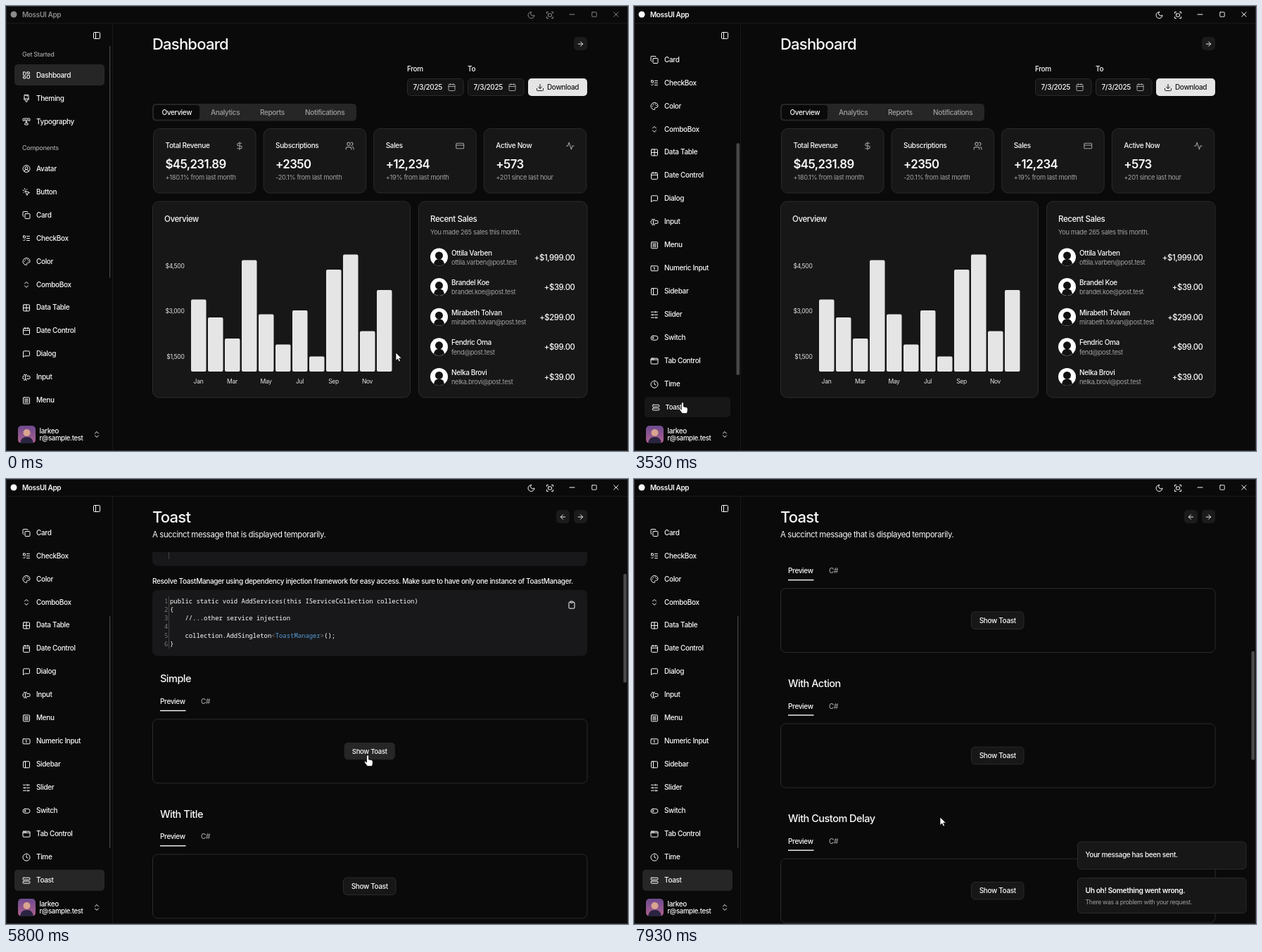
An HTML page that plays this animation: 884 by 633 pixels, repeating every 8000 ms.

```html
<!DOCTYPE html>
<html lang="en">
<head>
<meta charset="utf-8">
<title>Dashboard demo</title>
<style>
html, body { margin: 0; width: 100%; height: 100%; overflow: hidden; background: #0a0a0a; }
svg { display: block; width: 884px; height: 633px; }
text { font-family: Inter, sans-serif; letter-spacing: -.035em; white-space: pre; }
.code { font-family: "Noto Sans Mono", monospace; letter-spacing: 0; }
.icon { fill: none; stroke-linecap: round; stroke-linejoin: round; stroke-width: 2; }
</style>
</head>
<body>
<svg id="stage" viewBox="0 0 884 633"></svg>
<script>
const LOOP = 8000, NOTCH = 34.375, SIDE_MAX = 221;
const WHITE = '#fafafa', MUTED = '#a1a1a1', CARD = '#171717', LINE = '#2b2b2b';

// Path pieces on a 24 unit icon grid
const box = (x, y, w, h, r = 2) =>
  `M${x + r} ${y}h${w - 2 * r}a${r} ${r} 0 0 1 ${r} ${r}v${h - 2 * r}a${r} ${r} 0 0 1 ${-r} ${r}h${2 * r - w}a${r} ${r} 0 0 1 ${-r} ${-r}v${2 * r - h}a${r} ${r} 0 0 1 ${r} ${-r}z`;
const ring = (x, y, r) => box(x - r, y - r, 2 * r, 2 * r, r);

const ICONS = {
  Dashboard: box(3, 3, 7, 9, 1) + box(14, 3, 7, 5, 1) + box(14, 12, 7, 9, 1) + box(3, 16, 7, 5, 1),
  Theming: 'M10 2v2M14 2v4M6 12V2h12v10zM6 12l-1 2a2 2 0 0 0 2 2h3v4a2 2 0 1 0 4 0v-4h3a2 2 0 0 0 2-2l-1-2',
  Typography: 'M14 17h1a2 2 0 0 1 0 4H9a2 2 0 0 1 0-4h1V7H6v1a2 2 0 0 1-4 0V5a2 2 0 0 1 2-2h16a2 2 0 0 1 2 2v3a2 2 0 0 1-4 0V7h-4z',
  Avatar: 'M18 20a6 6 0 0 0-12 0' + ring(12, 10, 4) + ring(12, 12, 10),
  Button: 'M14 4l-2 2M5 8l-3-1M6 12l-2 2M7 2l1 3M9 9l12 5-5 2-2 5z',
  Card: box(8, 8, 14, 14) + 'M4 16a2 2 0 0 1-2-2V4a2 2 0 0 1 2-2h10a2 2 0 0 1 2 2',
  CheckBox: box(3, 5, 6, 6, 1) + 'M3 17l2 2 4-4M13 6h8M13 12h8M13 18h8',
  Color: 'M12 2a10 10 0 0 0 0 20c2 0 2-2 1-3s0-3 2-3h2a5 5 0 0 0 5-5c0-5-4-9-10-9z' + ring(14, 6.5, .5) + ring(17.5, 10.5, .5) + ring(8.5, 7.5, .5) + ring(6.5, 12.5, .5),
  ComboBox: 'M7 15l5 5 5-5M7 9l5-5 5 5',
  'Data Table': box(3, 3, 18, 18) + 'M12 3v18M3 12h18',
  'Date Control': box(3, 4, 18, 18) + 'M8 2v4M16 2v4M3 10h18',
  Dialog: 'M21 15a2 2 0 0 1-2 2H7l-4 4V5a2 2 0 0 1 2-2h14a2 2 0 0 1 2 2z',
  Input: 'M5 4h1a3 3 0 0 1 3 3 3 3 0 0 1 3-3h1M13 20h-1a3 3 0 0 1-3-3 3 3 0 0 1-3 3H5M5 16H4a2 2 0 0 1-2-2v-4a2 2 0 0 1 2-2h1M13 8h7a2 2 0 0 1 2 2v4a2 2 0 0 1-2 2h-7M9 7v10',
  Menu: box(3, 3, 18, 18) + 'M7 8h10M7 12h10M7 16h10',
  'Numeric Input': box(2, 5, 20, 14) + 'M10 10l2-1v6',
  Sidebar: box(3, 3, 18, 18) + 'M9 3v18',
  Slider: 'M21 4h-7M10 4H3M21 12h-9M8 12H3M21 20h-5M12 20H3M14 2v4M8 10v4M16 18v4',
  Switch: box(2, 6, 20, 12, 6) + ring(8, 12, 2),
  'Tab Control': box(2, 4, 20, 16) + 'M10 4v4M2 8h20M6 4v4',
  Time: ring(12, 12, 10) + 'M12 6v6l4 2',
  Toast: box(2, 4, 20, 6) + box(2, 14, 20, 6),
  moon: 'M12 3a6 6 0 0 0 9 9 9 9 0 1 1-9-9z',
  full: 'M3 7V3h4M17 3h4v4M21 17v4h-4M7 21H3v-4' + box(7, 8, 10, 8, 1),
  min: 'M5 11h14', max: box(5, 5, 14, 14, 1), close: 'M5 5l14 14M19 5L5 19',
  dollar: 'M12 2v20M17 5H9.5a3.5 3.5 0 0 0 0 7h5a3.5 3.5 0 0 1 0 7H6',
  users: 'M16 21v-2a4 4 0 0 0-4-4H6a4 4 0 0 0-4 4v2M22 21v-2a4 4 0 0 0-3-4M16 3a4 4 0 0 1 0 8' + ring(9, 7, 4),
  credit: box(2, 5, 20, 14) + 'M2 10h20',
  pulse: 'M22 12h-4l-3 9L9 3l-3 9H2',
  right: 'M5 12h14M12 5l7 7-7 7', left: 'M19 12H5M12 5l-7 7 7 7',
  download: 'M21 15v4a2 2 0 0 1-2 2H5a2 2 0 0 1-2-2v-4M7 10l5 5 5-5M12 15V3',
  clipboard: box(8, 2, 8, 4, 1) + 'M16 4h2a2 2 0 0 1 2 2v14a2 2 0 0 1-2 2H6a2 2 0 0 1-2-2V6a2 2 0 0 1 2-2h2'
};

const text = (x, cy, s, size = 10, fill = WHITE, weight = 500, anchor = 'start') =>
  `<text x="${x}" y="${cy + size * .36}" font-size="${size}" font-weight="${weight}" fill="${fill}" text-anchor="${anchor}">${s}</text>`;
const rect = (x, y, w, h, r, fill, stroke = 'none') =>
  `<rect x="${x}" y="${y}" width="${w}" height="${h}" rx="${r}" fill="${fill}" stroke="${stroke}"/>`;
const icon = (name, cx, cy, size = 12, color = WHITE) =>
  `<path class="icon" stroke="${color}" d="${ICONS[name]}" transform="translate(${cx - size / 2} ${cy - size / 2}) scale(${size / 24})"/>`;
const group = (id, body) => `<g id="${id}">${body}</g>`;
const navButton = (name, x) => rect(x, 44, 19, 19, 5, '#1b1b1b') + icon(name, x + 9.5, 54, 11);

// Sidebar
const rowY = {};
let sidebar = text(23, 69, 'Get Started', 9, MUTED) + text(23, 202, 'Components', 9, MUTED);
Object.keys(ICONS).slice(0, 21).forEach((name, i) => {
  const y = rowY[name] = i < 3 ? 98 + 33 * i : 231 + 32.98 * (i - 3);
  sidebar += `<g data-row="${name}">${rect(12, y - 15, 128, 30, 5, 'none')}${icon(name, 29, y + .5)}${text(43, y, name)}</g>`;
});
const account =
  rect(17, 597, 25, 25, 5, 'url(#dusk)') +
  '<path d="M20 622q1-9 9.500-9t9.500 9z" fill="#2a2440"/><circle cx="29.500" cy="607" r="5" fill="#d9a58f"/>' +
  text(47.5, 604, 'larkeo') + text(47.5, 615, 'r@sample.test', 9.6) + icon('ComboBox', 129, 609.5);

// Title bar
const titleBar = '<circle cx="11" cy="12" r="4.5" fill="currentColor"/>' +
  text(23, 12, 'MossUI App', 10, 'currentColor', 600) +
  [['moon', 746.5, 13], ['full', 773, 13], ['min', 804.5, 12.5], ['max', 836, 12, 11], ['close', 867, 12, 11]]
    .map(([n, x, y, s = 12]) => icon(n, x, y, s, 'currentColor')).join('');

// Dashboard page
const dateField = (x, label) => text(x, 89.5, label) + rect(x + .5, 103.5, 79.5, 24, 5, '#141414', LINE) +
  text(x + 8.5, 115.5, '7/3/2025') + icon('Date Control', x + 63.5, 115.5, 12, MUTED);
const stats = [
  ['Total Revenue', '$45,231.89', '+180.1% from last month', 'dollar'],
  ['Subscriptions', '+2350', '-20.1% from last month', 'users'],
  ['Sales', '+12,234', '+19% from last month', 'credit'],
  ['Active Now', '+573', '+201 since last hour', 'pulse']
].map(([label, value, note, glyph], i) => {
  const x = 209.5 + 156.6 * i;
  return rect(x, 174.5, 145.5, 91.5, 9, CARD, LINE) + text(x + 17, 198.5, label) +
    icon(glyph, x + 122.5, 199, 13, MUTED) + text(x + 17, 225, value, 16.8, WHITE, 600) + text(x + 17, 243.5, note, 9.3, MUTED, 400);
}).join('');
const bars = [417.5, 443, 473, 361.5, 438.5, 481.5, 433, 498.5, 375, 353.5, 462.5, 404]
  .map((y, i) => rect(263 + 24 * i, y, 21.5, 520 - y, 2, '#e5e5e5')).join('');
const sales = [
  ['Ottila Varben', 'ottila.varben', '1,999'], ['Brandel Koe', 'brandel.koe', '39'],
  ['Mirabeth Tolvan', 'mirabeth.tolvan', '299'], ['Fendric Oma', 'fend', '99'], ['Nelka Brovi', 'nelka.brovi', '39']
].map(([name, mail, sum], i) => {
  const y = 357 + 42.6 * i;
  return `<circle cx="615.5" cy="${y}" r="12.5" fill="#fff"/><circle cx="615.5" cy="${y - 2}" r="5.500" fill="#111"/>` +
    `<path d="M608 ${y + 10}q1-7 7.500-7t7.500 7q-7.500 5-15 0" fill="#111"/>` +
    text(633, y - 6, name) + text(633, y + 7.5, mail + '@post.test', 9.2, MUTED, 400) + text(808.5, y + .5, `+$${sum}.00`, 11.3, WHITE, 500, 'end');
}).join('');
const dashboard = text(208, 54, 'Dashboard', 22) + navButton('right', 807) +
  dateField(570, 'From') + dateField(656, 'To') +
  rect(742, 103, 84, 25, 5, '#e5e5e5') + icon('download', 759, 116, 12, CARD) + text(769, 115.5, 'Download', 10, CARD) +
  rect(208, 139, 290, 24.5, 5, '#262626') + rect(210, 141, 65, 20.5, 4, '#0a0a0a') + text(221.5, 151.5, 'Overview') +
  [['Analytics', 291], ['Reports', 361], ['Notifications', 425]].map(([s, x]) => text(x, 151.5, s, 10, MUTED)).join('') +
  stats +
  rect(208.5, 278, 366, 279, 9, CARD, LINE) + text(225, 302.5, 'Overview', 11.5) + bars +
  ['$4,500', '$3,000', '$1,500'].map((s, i) => text(253.5, 369.5 + 64.5 * i, s, 8.5, '#e5e5e5', 400, 'end')).join('') +
  ['Jan', 'Mar', 'May', 'Jul', 'Sep', 'Nov'].map((s, i) => text(273.5 + 48 * i, 534, s, 8.5, '#e5e5e5', 400, 'middle')).join('') +
  rect(586.5, 278, 239.5, 279, 9, CARD, LINE) + text(603, 302.5, 'Recent Sales', 11.5) +
  text(603, 322, 'You made 265 sales this month.', 9.2, MUTED, 400) + sales;

// Toast page
const span = (fill, s) => `<tspan fill="${fill}">${s}</tspan>`;
const codeBlock = (y, h, lines) => rect(208, y, 618, h, 7, '#18181a') + icon('clipboard', 804, y + 21.5, 12) +
  `<path d="M231.500 ${y + 9}v${h - 19}" stroke="#444"/>` +
  lines.map((s, i) => {
    const at = `class="code" font-size="8.92" y="${y + 19.2 + 12.2 * i}"`;
    return `<text ${at} x="225" fill="#777">${i + 1}</text><text ${at} x="233" fill="#fff" font-weight="500">${s}</text>`;
  }).join('');
const BLUE = '#569cd6', GREEN = '#6a9955', GREY = '#808080', RUST = '#ce9178';
const markup = [
  '    &lt;!── rest of the codes ' + span(GREEN, '──&gt;'),
  '    ' + span(GREY, '&lt;') + span(BLUE, 'toasts:ToastHost') + span('#9cdcfe', ' Manager') + '=' + span(RUST, '"{Binding ToastManager}"') + span(MUTED, ' /&gt;')
];
const setup = ['public static void AddServices(this IServiceCollection collection)', '{', '    //...other service injection', '',
  '    collection.AddSingleton' + span(GREY, '&lt;') + span(BLUE, 'ToastManager') + span(GREY, '&gt;') + '();', '}'];
const demos = ['Simple', 'With Title', 'With Action', 'With Custom Delay'].map((title, i) => {
  const y = 192.25 * i;
  return text(219, 318.5 + y, title, 14.5) + text(219, 351 + y, 'Preview') + text(277, 351 + y, 'C#', 10, MUTED) +
    rect(219, 363.2 + y, 36.5, 1.4, 0, WHITE) + rect(208.5, 376 + y, 617.5, 91, 7, 'none', LINE) +
    `<g data-demo="${i}">${rect(479.5, 409.2 + y, 74.5, 24.5, 5, CARD, LINE)}${text(516.75, 421.5 + y, 'Show Toast', 10, WHITE, 500, 'middle')}</g>`;
}).join('');
const toastPage = text(208, 54, 'Toast', 22) + navButton('left', 782) + navButton('right', 807) +
  text(208, 78.5, 'A succinct message that is displayed temporarily.', 11.4, WHITE, 400) +
  `<g clip-path="url(#pageClip)">${group('doc', codeBlock(103.5, 54.5, markup) +
    text(208, 179.5, 'Resolve ToastManager using dependency injection framework for easy access. Make sure to have only one instance of ToastManager.') +
    codeBlock(192, 94, setup) + demos)}</g>` +
  '<rect id="docBar" fill="#4a4a4a"/>';

const toast1 = rect(630.5, 578.5, 239.5, 39, 5, CARD, LINE) + text(641.5, 597, 'Your message has been sent.');
const toast2 = rect(630.5, 567.5, 239.5, 50, 5, CARD, LINE) + text(641.5, 585.5, 'Uh oh! Something went wrong.', 10.2, WHITE, 600) +
  text(641.5, 601.5, 'There was a problem with your request.', 8.7, MUTED, 400);
const pointer = group('arrow', '<path d="M0 0v11.500l2.700-2.500 1.900 4 2-.9-1.900-3.900h3.700z" fill="#fff" stroke="#000" stroke-width=".7"/>') +
  group('hand', '<path d="M-1.500 1.200a1.500 1.500 0 0 1 3 0V6l4 .8q1.700.4 1.700 2V12l-1 3.500h-6.500L-4 11q-1.300-2 .4-2.500l2.100 1.500z" fill="#fff" stroke="#000" stroke-width=".7"/>');

const stage = document.getElementById('stage');
stage.innerHTML = `<defs>
  <linearGradient id="dusk" x2="0" y2="1"><stop stop-color="#6d4a8f"/><stop offset="1" stop-color="#b0628f"/></linearGradient>
  <clipPath id="sideClip"><rect y="58" width="151" height="528"/></clipPath>
  <clipPath id="pageClip"><rect x="207" y="104" width="677" height="528"/></clipPath></defs>` +
  rect(.5, .5, 883, 632, 0, '#0a0a0a', '#303030') +
  '<path d="M1 24.500h882M151.500 25v607" stroke="#191919"/>' +
  group('titleBar', titleBar) + icon('Sidebar', 129, 42, 12) +
  `<g clip-path="url(#sideClip)">${group('side', sidebar)}</g><rect id="sideBar" fill="#484848"/>` + account +
  group('dash', dashboard) + group('toastPage', toastPage) +
  group('toast1', toast1) + group('toast2', toast2) + group('pointer', pointer);

const el = {};
stage.querySelectorAll('[id]').forEach(n => el[n.id] = n);
const rows = [...stage.querySelectorAll('[data-row]')];
const buttons = [...stage.querySelectorAll('[data-demo]')];
const set = (node, attrs) => Object.entries(attrs).forEach(([k, v]) => node.setAttribute(k, v));

// Timelines: [ms, value...]
const MOVES = [[70, 554, 493], [600, 100, 497], [1780, 100, 497], [1800, 99, 498], [2000, 99, 498], [2700, 69, 564], [4070, 69, 564],
  [4530, 449, 566], [5070, 449, 566], [5600, 514, 393], [5930, 514, 393], [6270, 452, 475], [6670, 452, 475],
  [7000, 515, 441], [7270, 515, 441], [7530, 435, 481]];
const SHAPES = [[0, 'arrow'], [540, 'hand'], [4130, 'arrow'], [5530, 'hand'], [5990, 'arrow'], [6930, 'hand'], [7330, 'arrow']];
const HOVERS = [[0, ''], [540, 'Dialog'], [870, 'Sidebar'], [1400, 'Tab Control'], [2200, 'Time'], [2550, 'Toast'], [4130, '']];
const SIDE_NOTCHES = [[0, 0], [670, 1], [740, 2], [800, 3], [870, 4], [1130, 6], [1200, 7]];
const DOC_NOTCHES = [[0, 0], [4870, 2], [4940, 3], [6470, 5], [6530, 6], [6600, 7],
  [7470, 8], [7530, 9], [7600, 10], [7670, 11], [7730, 12], [7870, 13], [7930, 14]];

const stepAt = (keys, t) => keys.filter(k => k[0] <= t).pop()[1];
const ramp = (t, from, to) => Math.min(1, Math.max(0, (t - from) / (to - from)));
const ease = p => p * p * (3 - 2 * p);
const easeOut = p => 1 - (1 - p) ** 3;
const press = (t, from, to) => 1 - .045 * (ramp(t, from, from + 70) - ramp(t, to, to + 70));
const scaleAt = (x, y, s) => `translate(${x} ${y}) scale(${s}) translate(${-x} ${-y})`;

function pointerAt(t) {
  const next = MOVES.findIndex(k => k[0] > t);
  if (next === 0) return MOVES[0].slice(1);
  if (next < 0) return MOVES[MOVES.length - 1].slice(1);
  const a = MOVES[next - 1], b = MOVES[next], p = ease(ramp(t, a[0], b[0]));
  return [a[1] + (b[1] - a[1]) * p, a[2] + (b[2] - a[2]) * p];
}

function draw(t) {
  const [x, y] = pointerAt(t), shape = stepAt(SHAPES, t);
  set(el.pointer, { transform: `translate(${x} ${y})` });
  for (const kind of ['arrow', 'hand']) set(el[kind], { opacity: +(kind === shape) });
  set(el.titleBar, { color: t < 2070 ? '#8c8c8c' : WHITE });

  const scroll = Math.min(SIDE_MAX, stepAt(SIDE_NOTCHES, t) * NOTCH), wide = t >= 470 && t < 4200;
  set(el.side, { transform: `translate(0 ${-scroll})` });
  set(el.sideBar, { x: wide ? 145.5 : 147, y: 57 + scroll * .626, width: wide ? 4.5 : 1.2, height: 329.5, rx: wide ? 1.5 : 0 });
  const hover = stepAt(HOVERS, t), selected = t < 3630 ? 'Dashboard' : 'Toast';
  rows.forEach(row => {
    const name = row.dataset.row;
    set(row.firstChild, { fill: name === selected ? '#262626' : name === hover ? CARD : 'none' });
    if (name === 'Toast') set(row, { transform: scaleAt(76, rowY[name], press(t, 3400, 3600)) });
  });

  const swap = ramp(t, 3600, 3730);
  set(el.dash, { opacity: 1 - swap });
  set(el.toastPage, { opacity: swap });
  const notches = stepAt(DOC_NOTCHES, t), thick = t >= 4330;
  set(el.doc, { transform: `translate(0 ${(2 - notches) * NOTCH})` });
  set(el.docBar, { x: thick ? 877.5 : 879.5, y: 105 + 10 * notches, width: thick ? 4.5 : 1.2, height: 154.5, rx: thick ? 1.5 : 0 });
  const scales = [press(t, 5700, 5830), press(t, 7100, 7200)];
  const hot = shape !== 'hand' || t < 5000 ? -1 : t < 6500 ? 0 : 1;
  buttons.forEach((b, i) => {
    set(b.firstChild, { fill: i === hot ? '#262626' : CARD });
    set(b, { transform: scaleAt(516.75, 421.5 + 192.25 * i, scales[i] || 1) });
  });

  const first = easeOut(ramp(t, 5870, 6150)), second = easeOut(ramp(t, 7230, 7500));
  set(el.toast1, { opacity: first, transform: `translate(0 ${4 * (1 - first) - 62.5 * second})` });
  set(el.toast2, { opacity: second, transform: `translate(0 ${4 * (1 - second)})` });
}

const start = performance.now();
function tick() {
  draw((performance.now() - start) % LOOP);
  requestAnimationFrame(tick);
}
tick();
</script>
</body>
</html>
```
